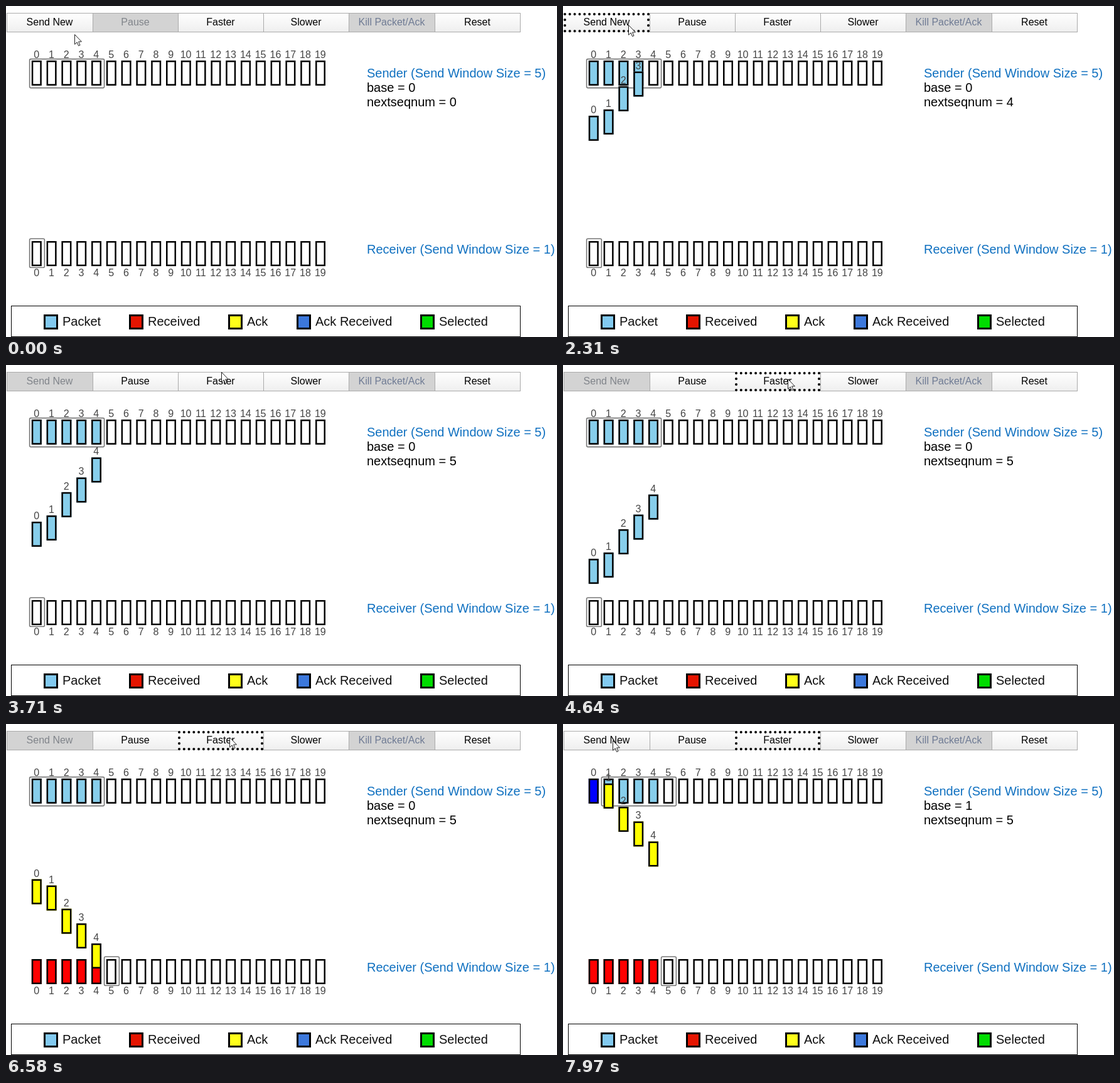
An HTML page with a canvas for the animation above (8000 ms loop, 878x528 px).

```html
<!DOCTYPE html>
<html>
<head>
<meta charset="utf-8">
<title>Go-back-N protocol</title>
<style>
html, body { margin: 0; width: 100%; height: 100%; overflow: hidden; background: #fff; }
canvas { display: block; }
</style>
</head>
<body>
<canvas id="stage" width="878" height="528"></canvas>
<script>
const g = document.getElementById('stage').getContext('2d');
const LOOP = 8000, SLOTS = 20, PITCH = 23.8, TOP = 87, BOTTOM = 375, TRIP = BOTTOM - TOP;
const SKY = '#87ceeb', GRAY = '#444';

// The screen refreshes in bursts of four steps
const bursts = [760, 1150, 1530, 1930, 2310, 2690, 3090, 3470, 3860, 4240, 4640, 5020,
  5400, 5800, 6180, 6580, 6960, 7360, 7740];
const steps = [0, 70, 150, 530, ...bursts.flatMap(b => [b, b + 77, b + 153, b + 230])];

// Pixels travelled since the start; "Faster" raises the speed twice
const speeds = [[0, .0539], [4390, .088], [5800, .117]];
const travelled = t => speeds.reduce((sum, [from, v], i) => {
  const to = i < 2 ? speeds[i + 1][0] : LOOP;
  return sum + v * Math.max(0, Math.min(t, to) - from);
}, 0);
const departures = [36.5, 46.5, 83.6, 107, 139];

// Mouse: time, x, y
const path = [[0, 109, 45], [70, 106, 37], [150, 104, 30], [3320, 104, 30], [3470, 130, 29],
  [3710, 352, 10], [3860, 357, 15], [3940, 358, 22], [6570, 358, 22], [6660, 340, 17],
  [6810, 205, 16], [6960, 130, 9], [7190, 83, 28], [7360, 79, 26], [LOOP, 79, 26]];

const edges = [1, 138, 274, 410, 546, 683, 819];
const labels = ['Send New', 'Pause', 'Faster', 'Slower', 'Kill Packet/Ack', 'Reset'];
const legend = [[60, 'Packet', '#82caf0'], [196, 'Received', '#e51400'], [354, 'Ack', '#ffff1a'],
  [463, 'Ack Received', '#3c78dc'], [660, 'Selected', '#00dc00']];

const slotX = i => 48.8 + PITCH * i;

function text(s, x, y, color = '#000', size = 20, align = 'left') {
  g.font = size + 'px "Liberation Sans", Arial, sans-serif';
  g.textAlign = align;
  g.fillStyle = color;
  g.fillText(s, x, y);
}

function box(x, y, w, h, line, fill) {
  g.lineWidth = line;
  g.strokeStyle = '#000';
  g.fillStyle = fill;
  g.fillRect(x, y, w, h);
  g.strokeRect(x + line / 2, y + line / 2, w - line, h - line);
}

function slot(i, y, fill, labelY) {
  box(slotX(i) - 8, y, 16, 40, 2.5, fill);
  text(i, slotX(i) - .2, labelY, GRAY, 16, 'center');
}

function frame(first, count, y) {
  g.strokeStyle = '#777';
  g.lineWidth = 1.6;
  g.beginPath();
  g.roundRect(37.6 + PITCH * first, y, PITCH * count, 46, 2);
  g.stroke();
}

function button(i, enabled, focused) {
  const x = edges[i], w = edges[i + 1] - x;
  const shade = g.createLinearGradient(0, 11, 0, 42);
  shade.addColorStop(0, '#fff');
  shade.addColorStop(1, '#eee');
  g.fillStyle = enabled ? shade : '#d3d3d3';
  g.fillRect(x, 11, w, 31);
  if (focused) {
    g.fillStyle = '#000';
    const dot = (cx, cy) => {
      g.beginPath();
      g.arc(cx, cy, 2, 0, 7);
      g.fill();
    };
    for (let k = 0; k <= 17; k++) {
      const cx = x + 2 + (w - 4) * k / 17;
      dot(cx, 13);
      dot(cx, 40);
    }
    for (let k = 1; k < 3; k++) {
      dot(x + 2, 13 + 9 * k);
      dot(x + w - 2, 13 + 9 * k);
    }
  } else {
    g.strokeStyle = '#aaa';
    g.lineWidth = 1;
    g.strokeRect(x + .5, 11.5, w, 30);
  }
  const color = enabled ? '#000' : i == 4 ? '#6f7b94' : '#80848a';
  text(labels[i], x + w / 2, 31, color, 16, 'center');
}

function cursor(t) {
  const i = Math.max(1, path.findIndex(p => p[0] >= t));
  const [t0, x0, y0] = path[i - 1], [t1, x1, y1] = path[i];
  const k = (t - t0) / (t1 - t0);
  g.save();
  g.translate(Math.round(x0 + (x1 - x0) * k), Math.round(y0 + (y1 - y0) * k));
  g.fillStyle = '#fff';
  g.strokeStyle = '#222';
  g.lineWidth = 1;
  const arrow = new Path2D('M.5 .5V16.2L4.2 12.8 6.6 18.5 9 17.4 6.6 11.9H11.4Z');
  g.fill(arrow);
  g.stroke(arrow);
  g.restore();
}

function draw(t) {
  const d = travelled(t);
  const gone = departures.map(start => d - start);
  const count = limit => gone.filter(v => v >= limit).length;
  const sent = count(0), received = count(TRIP), base = count(2 * TRIP);

  g.fillStyle = '#fff';
  g.fillRect(0, 0, 878, 528);

  const focus = t < 530 ? -1 : t < 4390 ? 0 : 2;
  const enabled = [sent < base + 5, sent > 0, true, true, false, true];
  labels.forEach((_, i) => i != focus && button(i, enabled[i], false));
  if (focus >= 0) button(focus, enabled[focus], enabled[focus]);

  for (let i = 0; i < SLOTS; i++) {
    slot(i, TOP, i < base ? '#00f' : i < sent ? SKY : '#fff', 83);
    const fresh = gone[i] - TRIP < 10;
    slot(i, BOTTOM, i >= received ? '#fff' : fresh ? '#c4000c' : '#f00', 431);
  }
  frame(base, 5, 84.6);
  frame(received, 1, 371.2);

  gone.forEach((v, i) => {
    if (v < 0 || v >= 2 * TRIP) return;
    const y = v < TRIP ? TOP + v : BOTTOM - (v - TRIP);
    slot(i, y, v < TRIP ? SKY : '#ff0', y - 4);
  });

  text('Sender (Send Window Size = 5)', 575, 114, '#0f70c0');
  text('base = ' + base, 575, 137);
  text('nextseqnum = ' + sent, 575, 160);
  text('Receiver (Send Window Size = 1)', 575, 395, '#0f70c0');

  box(8, 478, 812, 50, 1, '#fff');
  for (const [x, name, color] of legend) {
    box(x, 492, 23, 24, 3, color);
    text(name, x + 30, 510, '#111');
  }
  cursor(t);
}

function tick(now) {
  const t = now % LOOP;
  draw(steps.findLast(s => s <= t + 3));
  requestAnimationFrame(tick);
}
requestAnimationFrame(tick);
</script>
</body>
</html>
```
